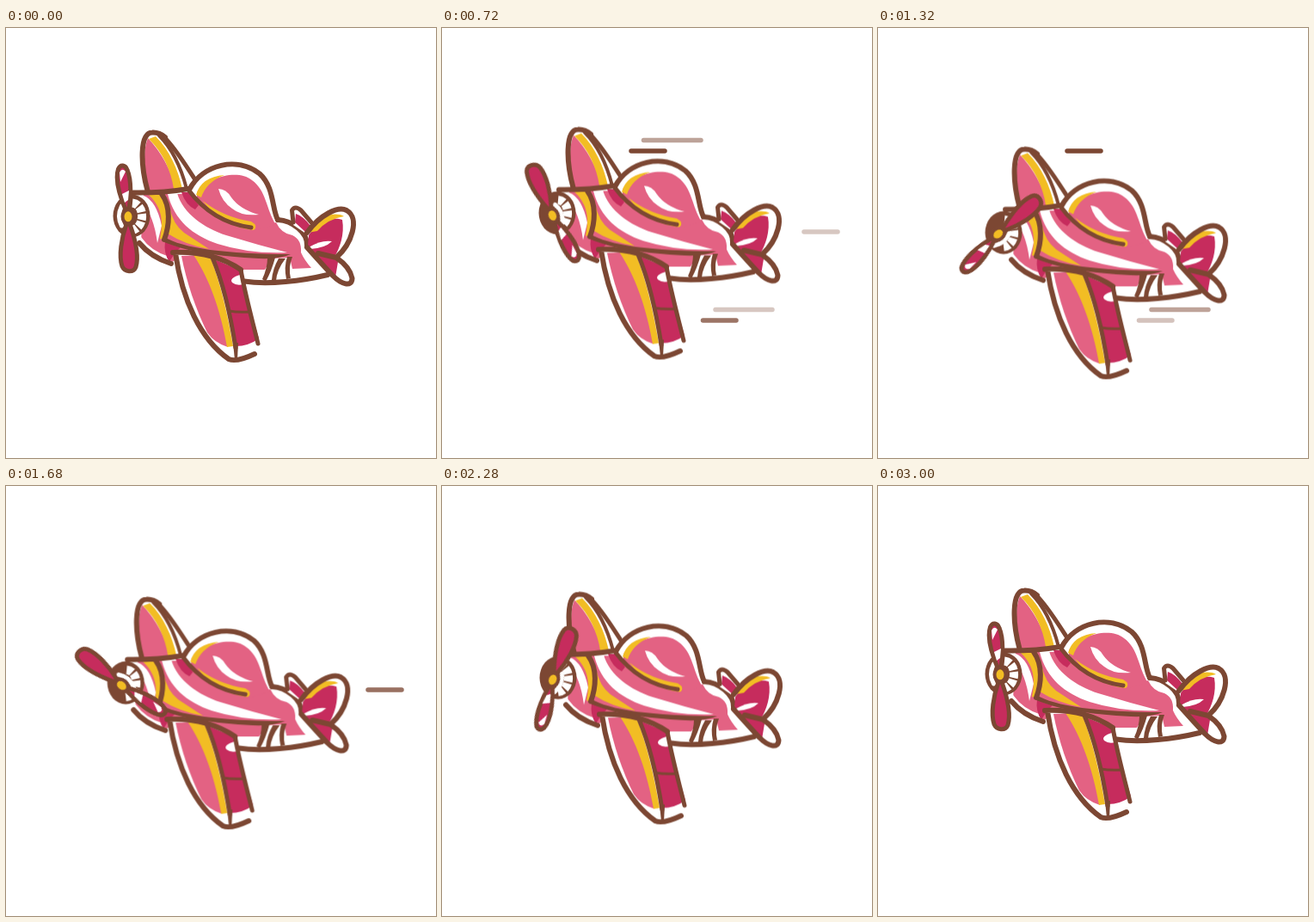
An HTML page without scripts for the animation above (3.04 s loop, 500 by 500 pixels).

```html
<!DOCTYPE html>
<html lang="en">
<head>
<meta charset="utf-8">
<title>Little plane</title>
<style>
html, body { margin: 0; width: 100%; height: 100%; overflow: hidden; background: #fff; }
svg { display: block; width: 100%; height: 100%; }
.ink { fill: none; stroke: #7c4733; stroke-width: 6; stroke-linecap: round; stroke-linejoin: round; }
.mid { stroke-width: 5; }
.thin { stroke-width: 3; }
.pink { fill: #e36283; }
.red { fill: #c62c5d; }
.sun { fill: #f2bd24; }
.white { fill: #fff; }
.brown { fill: #7c4733; }

.sway, .bob { animation: 3.04s infinite cubic-bezier(.333, 0, .667, 1); }
.sway { animation-name: sway; }
.bob { animation-name: bob; }
.prop { transform-origin: 141px 220.3px; animation: spin 3.04s -1ms infinite steps(75); }
.wind path { stroke-width: 5.5; opacity: 0; animation: 3.04s linear infinite; }

@keyframes sway {
  0%, 98.68%, 100% { transform: translateX(0); }
  8.55% { transform: translateX(7px); }
  28.29% { transform: translateX(-15px); }
  46.05% { transform: translateX(1px); }
  65.79% { transform: translateX(-16px); }
  92.11% { transform: translateX(1.5px); }
}
@keyframes bob {
  0%, 98.68%, 100% { transform: translateY(0); }
  13.82% { transform: translateY(20px); }
  27.96% { transform: translateY(-10px); animation-timing-function: cubic-bezier(.3, 0, .55, 1); }
  46.71% { transform: translateY(21px); }
  68.2% { transform: translateY(-9.5px); }
  81.25% { transform: translateY(16.5px); }
}
@keyframes spin {
  0% { transform: rotate(0); }
  98.684%, 100% { transform: rotate(2160deg); }
}
@keyframes wind1 {
  0%, 30%, 78%, 91%, 100% { opacity: 0; }
  7.9%, 23.7%, 84.2% { opacity: .5; }
  15% { opacity: 1; }
}
@keyframes wind2 {
  0%, 3%, 32%, 36%, 52%, 100% { opacity: 0; }
  7.9% { opacity: .5; }
  14%, 24.5%, 41%, 44.5% { opacity: 1; }
}
@keyframes wind3 {
  0%, 1%, 50%, 80%, 90%, 100% { opacity: 0; }
  6.5%, 18% { opacity: 1; }
  23.7% { opacity: .75; }
  43.4% { opacity: .33; }
  84.2% { opacity: .25; }
}
@keyframes wind4 {
  0%, 20%, 52%, 100% { opacity: 0; }
  23.7% { opacity: .3; }
  31%, 37% { opacity: 1; }
  43.4% { opacity: .5; }
}
@keyframes wind5 {
  0%, 14%, 42%, 49%, 64%, 76%, 91%, 100% { opacity: 0; }
  18.5%, 55% { opacity: .8; }
  23.7% { opacity: .3; }
  31% { opacity: .9; }
  81% { opacity: 1; }
  84.2% { opacity: .75; }
}
@keyframes wind6 {
  0%, 78%, 91%, 100% { opacity: 0; }
  84.2% { opacity: .55; }
}
</style>
</head>
<body>
<svg viewBox="0 0 500 500">
  <g class="ink wind">
    <path d="M234.500 130.500H301" style="animation-name:wind1"/>
    <path d="M220 143H259" style="animation-name:wind2"/>
    <path d="M303.500 340H342" style="animation-name:wind3"/>
    <path d="M318 327.500H384" style="animation-name:wind4"/>
    <path d="M421 237H460" style="animation-name:wind5"/>
    <path d="M413 260H452" style="animation-name:wind6"/>
  </g>

  <g class="sway"><g class="bob">
    <!-- far wing -->
    <path class="white" d="M165 190C157 160 155 121 171 121Q184 121 221 176L214 190Z"/>
    <path class="pink" d="M166 190C160 165 159 142 165 128Q188 152 198 188Z"/>
    <path class="sun" d="M166 129L174 126C190 142 200 164 205 187H195C192 166 182 144 166 129Z"/>
    <path class="ink" d="M164.500 189C156.500 160 155 122 170 121.500Q178 121 185 127"/>
    <path class="ink" style="stroke-width:4" d="M178 125C193 140 203 160 210 187"/>
    <path class="ink mid" d="M184 127C198 141 209 160 221 178"/>

    <!-- fuselage -->
    <path class="white" d="M148 191L212 188L316 222Q345 226 351 250L376 285Q340 297 276 294L192 272L155 250Z"/>
    <path class="pink" d="M160 193H212L288 234L314 226Q320 239 333 241Q344 246 343 261Q347 270 355 279L333 280L330 267L309 268L301 281H270L200 268L190 274Q170 264 157 248Z"/>
    <path class="white" d="M160 195Q175 201 181 230L176 250Q172 218 158 203Z"/>
    <path class="white" d="M188 193L199 192C206 216 231 233 256 241Q292 252 327 261Q284 263 246 251C217 241 196 224 188 193Z"/>
    <path class="white" d="M157 243Q169 260 190 266L191 273Q170 268 154 250Z"/>
    <path class="sun" d="M165 193L180 191C192 207 191 229 183 246L179 245C184 222 180 207 165 193Z"/>
    <path class="sun" d="M190 208Q194 228 207 238L236 257Q208 252 188 239Z"/>
    <path class="red" d="M204 191L213 191L224 206L220 211Q209 206 204 191Z"/>
    <path class="red" d="M185 248Q193 253 203 255L196 262L190 272Q183 262 185 248Z"/>
    <path class="ink" d="M148 191.500Q182 192 212 187M181 193C192 208 190 230 184 246M155 250Q168 266 192 274"/>
    <path class="brown" d="M184 243C205 256 256 263 331 263Q318 269 294 268C248 266 207 259 184 249Z"/>
    <path class="ink" d="M277 294.500C305 299 345 294 374 287M316 223C333 224 351 238 350 253"/>
    <path class="brown" d="M304 267H313Q309 282 302 295L298 292Q304 279 304 267ZM317 268H325Q315 281 314 294L309 293Q310 280 317 268ZM327 266H333Q328 278 331 291L326 292Q323 278 327 266Z"/>

    <!-- small rear fin -->
    <path class="white" d="M334 229L332 212Q339 206 357 229L350 240Z"/>
    <path class="red" d="M337 216Q346 219 354 230L348 237L336 226Z"/>
    <path class="ink mid" d="M334 226L332.500 212Q336 206 343 212L355 226"/>

    <!-- tail -->
    <path class="white" d="M352 242C362 218 384 208 395 211C412 218 405 250 384 267Q402 280 403 292Q402 302 388 296L352 258Z"/>
    <path class="red" d="M352 241C362 224 380 219 391 223C394 240 388 256 382 266L386 272L383 290Q363 272 351 253Z"/>
    <path class="sun" d="M351 238C363 218 382 213 393 219Q374 222 362 236Z"/>
    <path class="white" d="M352 255Q367 246 379 248Q371 256 354 257Z"/>
    <path class="ink" d="M350 238C365 217 386 207 396 212C412 221 402 251 384 267Q400 278 402.500 291C402 302 390 298 380 288Q366 273 350 255M363 262L384 267"/>

    <!-- canopy -->
    <path class="white" d="M213 188C229 158 269 149 295 169.500C312 185 310 211 316 223L288 234Q240 225 213 188Z"/>
    <path class="pink" d="M222 191C235 173 270 164 286 177C303 189 302 210 314 229L288 236Q244 225 222 197Z"/>
    <path class="sun" d="M221 194Q227 173 254 171Q233 179 227 197Z"/>
    <path class="sun" d="M229 201Q253 220 285 225Q294 230 288 235Q250 231 229 201Z"/>
    <path class="white" d="M247 187Q256 187 262 197Q272 211 294 217Q274 219 263 210Q251 202 247 187Z"/>
    <path class="ink" d="M213 188C229 158 269 149 295 169.500C312 185 309 210 316 223"/>
    <path class="ink mid" d="M212 188Q240 226 285 232"/>

    <!-- near wing -->
    <path class="white" d="M197 262L236 263L272 280L294 367L290 379L264 387Q214 356 197 262Z"/>
    <path class="pink" d="M204 265L225 264C240 294 251 335 258 371Q242 366 234 354C221 328 210 296 204 265Z"/>
    <path class="sun" d="M218 264L237 265C250 298 258 334 264 370L257 371C250 330 237 292 218 264Z"/>
    <path class="red" d="M240 268L271 281L294 361Q282 370 267 370C264 336 254 298 240 268Z"/>
    <path class="white" d="M272 287Q259 291 263 296Q268 300 276 298Z"/>
    <path class="ink" d="M194 261Q240 259 273 281M197 262C205 316 226 362 259 385Q268 389 289 379"/>
    <path class="ink mid" d="M240 267C254 300 262 340 267 372"/>
    <path class="brown" d="M264 366L270 366L269 386L266 386Z"/>
    <path class="ink mid" d="M273 281C278 310 286 338 293 367"/>
    <path class="ink thin" d="M259 329Q270 331 284 330"/>

    <!-- engine -->
    <ellipse class="brown" cx="146" cy="218.500" rx="21.500" ry="25"/>
    <path fill="none" stroke="#fff" stroke-width="10" stroke-dasharray="7 2" d="M147 203.500C162 205 162 233 146 235"/>

    <!-- propeller -->
    <g class="prop">
      <path fill="none" stroke="#fff" stroke-width="5" stroke-linecap="round" d="M134.500 207Q128.500 219 134.500 230"/>
      <path class="ink mid" style="fill:#c62c5d" d="M139 211C133 197 126 178 130.500 164C133 158 139 159 141 165C146 177 145 197 143 211Z"/>
      <path class="white" d="M132 168Q135 162 139 167L133 179ZM135 193L143 189L142 200L138 203Z"/>
      <path class="ink mid" style="fill:#c62c5d" d="M140 228C134 245 131 265 135 277C138 284 148 285 151 278C155 265 150 245 144 228Z"/>
      <ellipse class="ink" style="fill:#f2bd24;stroke-width:4" cx="142" cy="219.300" rx="6.500" ry="8"/>
    </g>
  </g></g>
</svg>
</body>
</html>
```
